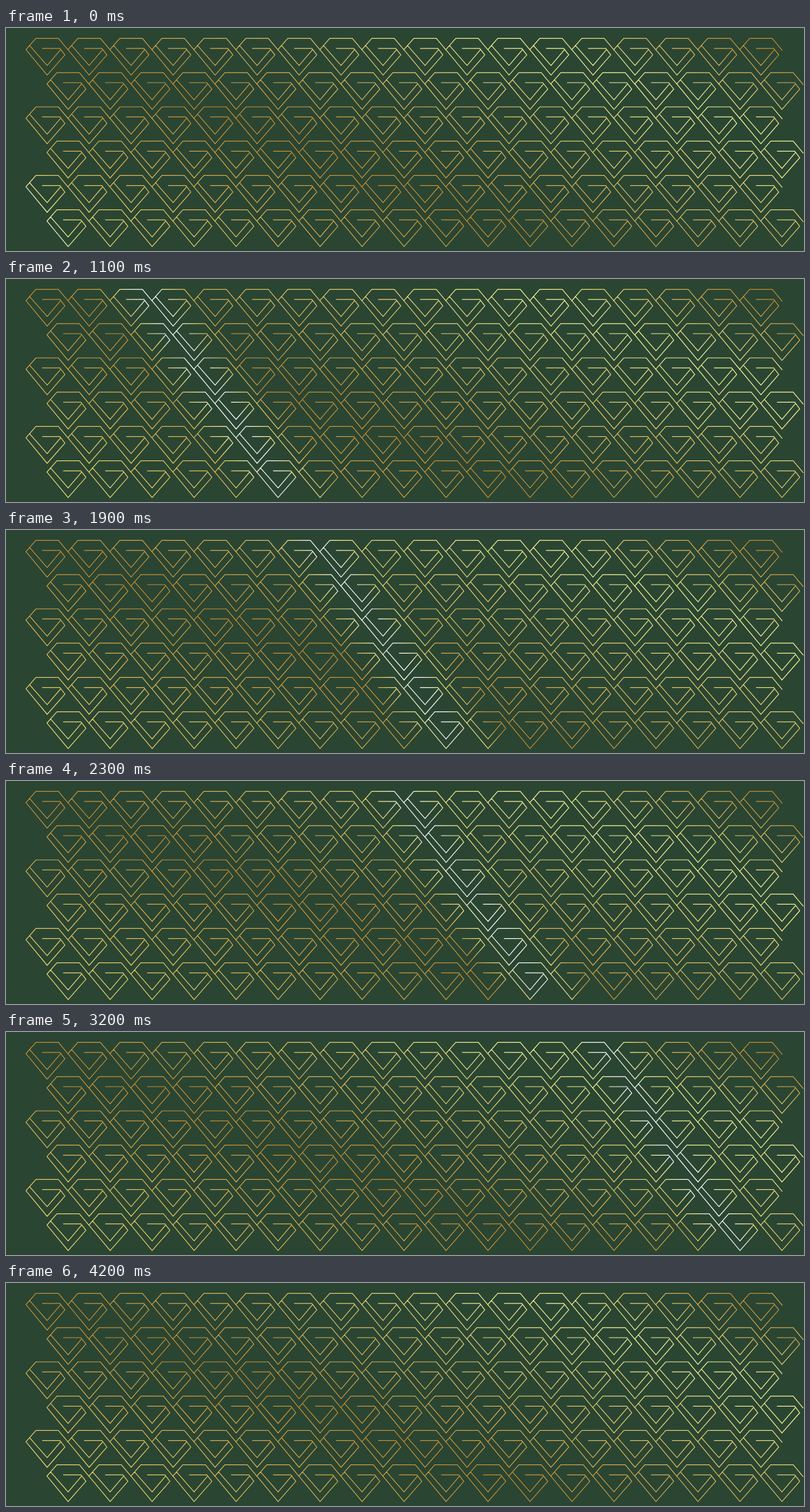
Animation, 1280 px wide and 359 px high, one loop 4250 ms. Source, as an HTML page:

```html
<!DOCTYPE html>
<html lang="en">
<head>
<meta charset="utf-8">
<title>Gold diamond pattern</title>
<style>
  html, body { margin: 0; width: 100%; height: 100%; overflow: hidden; background: #2a4532; }
  svg { display: block; width: 1280px; height: 359px; }
  #lines { fill: none; stroke: #fff; stroke-width: 1.2; }
  #shine { animation: sweep 4250ms steps(85, end) -4ms infinite; }
  @keyframes sweep {
    from { transform: translateX(-174px); }
    to { transform: translateX(1301px); }
  }
</style>
</head>
<body>
<svg viewBox="0 0 1280 359">
  <defs>
    <linearGradient id="gold" gradientUnits="userSpaceOnUse" x1="-110.3" y1="275.9" x2="165.5" y2="-413.8">
      <stop offset="0" stop-color="#fbe97c"/>
      <stop offset=".4" stop-color="#c78c30"/>
      <stop offset=".8" stop-color="#fffc9c"/>
      <stop offset=".97" stop-color="#c78c30"/>
    </linearGradient>
    <linearGradient id="glow">
      <stop offset="0" stop-color="#fff68c" stop-opacity="0"/>
      <stop offset=".25" stop-color="#fff996" stop-opacity=".75"/>
      <stop offset=".42" stop-color="#fff"/>
      <stop offset=".58" stop-color="#fff"/>
      <stop offset=".75" stop-color="#fff996" stop-opacity=".75"/>
      <stop offset="1" stop-color="#fff68c" stop-opacity="0"/>
    </linearGradient>
    <mask id="web" maskUnits="userSpaceOnUse" x="0" y="0" width="1280" height="359">
      <path id="lines"/>
    </mask>
  </defs>
  <g mask="url(#web)">
    <rect width="1280" height="359" fill="url(#gold)"/>
    <g id="shine">
      <rect x="-80" width="160" height="359" fill="url(#glow)" transform="skewX(35)"/>
    </g>
  </g>
</svg>
<script>
  const COLS = 18, ROWS = 6, DX = 67.35, DY = 55.2;

  // One open diamond, relative to its bottom tip's x and its top edge
  const strokes = [
    [[34.3, 19.5], [18, 0], [-18, 0], [-34, 18.2], [0, 59.3], [28.5, 26.7], [20.5, 16.2], [-8, 16.2]],
    [[-28.2, 11.6], [0, 43.8], [21.4, 18.6]]
  ];

  const diamond = (x, y) => strokes
    .map(s => 'M' + s.map(([px, py]) => `${(x + px).toFixed(2)} ${(y + py).toFixed(2)}`).join('L'))
    .join('');

  let d = '';
  for (let r = 0; r < ROWS; r++)
    for (let c = 0; c < COLS; c++)
      d += diamond(66 + (c + r % 2 / 2) * DX, 16.6 + r * DY);
  document.getElementById('lines').setAttribute('d', d);
</script>
</body>
</html>
```
